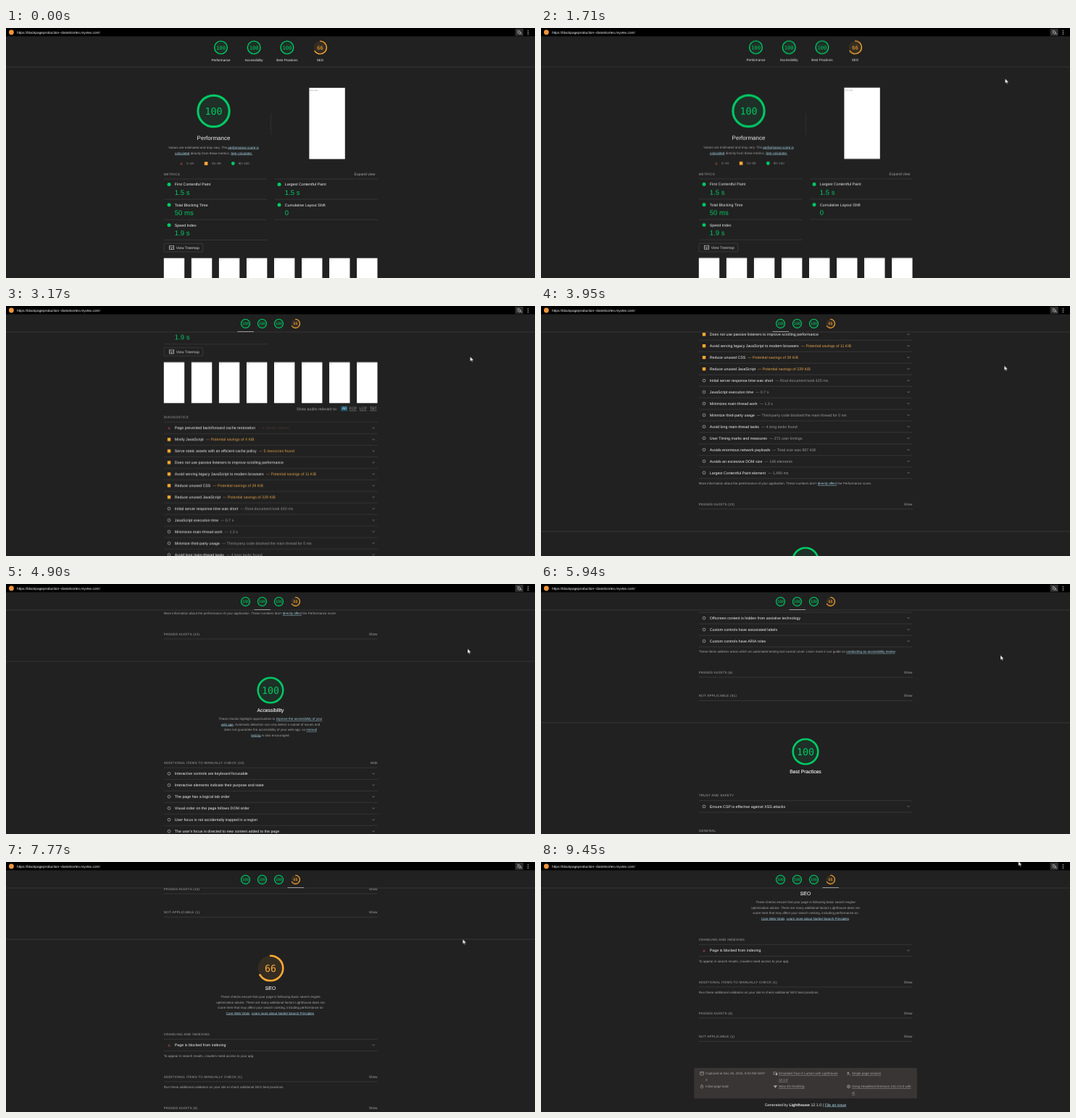
An HTML page for the animation above (9570 ms loop, 730 px wide and 346 px high).

```html
<!DOCTYPE html>
<html lang="en">
<head>
<meta charset="utf-8">
<title>Lighthouse report</title>
<style>
html, body { margin: 0; width: 100%; height: 100%; overflow: hidden; background: #212121; }
svg { display: block; width: 730px; height: 346px; }
text { font-family: "Liberation Sans", Arial, sans-serif; text-rendering: geometricPrecision; white-space: pre; }
.mono { font-family: "DejaVu Sans Mono", monospace; }
.caps { letter-spacing: .24px; }
.link { fill: #a8d4e6; text-decoration: underline; }
.under { text-decoration: underline; }
.rule { stroke: #464646; stroke-width: .6; }
#page { animation: scroll 9570ms linear infinite; }
#sticky { animation: reveal 9570ms step-end infinite; }
#mark { animation: mark 9570ms step-end infinite; }
#pointer { animation: move 9570ms linear infinite, appear 9570ms step-end infinite; }
@keyframes scroll {
  0%, 17.868% { transform: translateY(0); }
  19.331%, 22.466% { transform: translateY(-38px); }
  24.138%, 25.705% { transform: translateY(-76px); }
  26.541% { transform: translateY(-97px); }
  41.275%, 42.633% { transform: translateY(-418px); }
  43.156%, 45.037% { transform: translateY(-437px); }
  62.069%, 63.218% { transform: translateY(-950px); }
  81.191%, 82.132% { transform: translateY(-1318px); }
  84.117%, 88.401% { transform: translateY(-1406px); }
  90.7%, 100% { transform: translateY(-1449px); }
}
@keyframes reveal { 0% { opacity: 0; } 22.686%, 100% { opacity: 1; } }
@keyframes mark {
  0% { transform: translateX(0); }
  49.02% { transform: translateX(23px); }
  64.15% { transform: translateX(46px); }
  77.97%, 100% { transform: translateX(69px); }
}
@keyframes move {
  0%, 36.364% { transform: translate(640.5px, 70px); }
  41.275%, 42.633% { transform: translate(639.3px, 82.5px); }
  62.069%, 63.218% { transform: translate(634px, 98.5px); }
  81.191%, 95.611% { transform: translate(630.3px, 106.8px); }
  98.746%, 100% { transform: translate(658.8px, -1.2px); }
}
@keyframes appear { 0% { opacity: 0; } 17.868%, 100% { opacity: 1; } }
</style>
</head>
<body>
<svg viewBox="0 0 730 346">
  <g id="page"></g>
  <g id="sticky"></g>
  <g id="topbar"></g>
  <g id="pointer"><path d="M0 0V6.6L1.6 5.2L2.7 7.5L3.7 7L2.7 4.9H4.7Z" fill="#fff" stroke="#111" stroke-width=".4"/></g>
</svg>
<script>
const GREEN = '#00c964', ORANGE = '#fa3', RED = '#7a3c38', WHITE = '#f2f2f2', GREY = '#a6a6a6';
const LEFT = 217.8, RIGHT = 512.5, MID = 365, PITCH = 15.96;

// y is the vertical centre of the line
const text = (x, y, s, size = 5.3, fill = WHITE, attr = '') =>
  `<text x="${x}" y="${y + size * .35}" font-size="${size}" fill="${fill}" ${attr}>${s}</text>`;
const centre = (x, y, s, size, fill, attr = '') => text(x, y, s, size, fill, 'text-anchor="middle" ' + attr);
const right = (x, y, s, size, fill) => text(x, y, s, size, fill, 'text-anchor="end"');
const rect = (x, y, w, h, fill, attr = '') =>
  `<rect x="${x}" y="${y}" width="${w}" height="${h}" fill="${fill}" ${attr}/>`;
const dot = (x, y, r, fill, attr = '') => `<circle cx="${x}" cy="${y}" r="${r}" fill="${fill}" ${attr}/>`;
const rule = (y, x1 = LEFT, x2 = RIGHT) => `<line class="rule" x1="${x1}" x2="${x2}" y1="${y}" y2="${y}"/>`;
const line = (d, colour = GREY, w = .6) => `<path d="${d}" fill="none" stroke="${colour}" stroke-width="${w}"/>`;
const link = s => `<tspan class="link">${s}</tspan>`;
const triangle = (x, y) => `<path d="M${x} ${y - 1.9}l2 3.7h-4z" fill="${RED}"/>`;

function gauge(x, y, r, w, score, size) {
  const c = score < 90 ? ORANGE : GREEN, mid = r - w / 2;
  return dot(x, y, mid, c, 'fill-opacity=".09"') +
    dot(x, y, mid, 'none', `stroke="${c}" stroke-width="${w}" stroke-linecap="round" pathLength="100"
      stroke-dasharray="${score} 100" transform="rotate(-90 ${x} ${y})"`) +
    centre(x, y, score, size, c, 'class="mono"');
}

const markers = {
  fail: y => triangle(225, y),
  warn: y => rect(222.8, y - 2.2, 4.4, 4.4, ORANGE),
  info: y => dot(225, y, 1.9, 'none', 'stroke="#bdbdbd" stroke-width=".7"')
};

function audit(y, kind, title, detail) {
  const colour = { fail: '#4a3a39', warn: '#e3a24a', info: '#999' }[kind];
  const extra = detail ? `<tspan fill="${colour}">  — ${detail}</tspan>` : '';
  return markers[kind](y) + text(232.8, y, title + extra) +
    line(`M505.5 ${y - .8}l1.6 1.6l1.6 -1.6`) + rule(y + 8);
}
const audits = (y, list) => list.map((a, i) => audit(y + i * PITCH, ...a)).join('');
const heading = (y, s) => text(LEFT, y, s, 4.56, GREY, 'class="caps"');
const group = (y, s, list) => heading(y, s) + rule(y + 7.3) + audits(y + 15.4, list);
const clump = (y, s, label = 'Show') => heading(y, s) + right(RIGHT, y, label, 4.7, GREY) + rule(y + 7);
const note = (y, s) => text(LEFT, y, s, 4.5, GREY);

function category(y, title, score, lines = []) {
  return rule(y, 0, 730) + gauge(MID, y + 40, 18.6, 2.6, score, 13.3) +
    centre(MID, y + 68, title, 6.8, WHITE, 'stroke="#f2f2f2" stroke-width=".12"') +
    lines.map((s, i) => centre(MID, y + 79.5 + i * 7.5, s, 4.5, GREY)).join('');
}

function metric(x, y, title, value) {
  return dot(x, y, 2.5, GREEN) + text(x + 7.8, y, title) +
    text(x + 7.8, y + 11, value, 9.5, GREEN);
}

const names = ['Performance', 'Accessibility', 'Best Practices', 'SEO'], scores = [100, 100, 100, 66];

function summary() {
  return names.map((n, i) => gauge(296.5 + i * 45.7, 27, 9.6, 1.4, scores[i], 7.2) +
    centre(296.5 + i * 45.7, 44, n, 4.56, WHITE)).join('') + rule(54, 0, 730);
}

function performance_() {
  let s = gauge(286.5, 115, 23.2, 3.1, 100, 13.4) + centre(286.5, 152.2, 'Performance', 8, WHITE) +
    centre(286.5, 165, 'Values are estimated and may vary. The ' + link('performance score is'), 4.56, GREY) +
    centre(286.5, 173, link('calculated') + ' directly from these metrics. ' + link('See calculator.'), 4.56, GREY) +
    triangle(242, 187.5) + text(249, 187.5, '0–49', 4.5, '#8c8c8c') +
    rect(273.8, 185.2, 4.6, 4.6, ORANGE) + text(284, 187.5, '50–89', 4.5, '#8c8c8c') +
    dot(313.3, 187.5, 2.4, GREEN) + text(320.8, 187.5, '90–100', 4.5, '#8c8c8c') +
    line('M365.5 118V148', '#3a3a3a') +
    rect(418.4, 82.8, 49.4, 98.6, '#fff') + text(419.3, 86.4, 'Black page', 2.2, '#777');
  s += heading(202, 'METRICS') + right(509.5, 202, 'Expand view', 5.1, GREY);
  for (let i = 0; i < 4; i++) {
    const y = 209 + i * 28.1;
    s += rule(y, LEFT, 360) + (i < 3 ? rule(y, 371, RIGHT) : '');
  }
  s += metric(225, 216.6, 'First Contentful Paint', '1.5 s') + metric(377, 216.6, 'Largest Contentful Paint', '1.5 s') +
    metric(225, 244.7, 'Total Blocking Time', '50 ms') + metric(377, 244.7, 'Cumulative Layout Shift', '0') +
    metric(225, 272.8, 'Speed Index', '1.9 s');
  s += rect(218, 298.2, 53.6, 11.6, 'none', 'stroke="#4c4c4c" stroke-width=".6" rx="1"') +
    rect(225.3, 301.6, 6.4, 4.8, 'none', 'stroke="#ccc" stroke-width=".7"') +
    line('M225.3 304H231.7M228.5 304V306.4', '#ccc') + text(234.8, 304, 'View Treemap', 5, '#d8d8d8');
  for (let i = 0; i < 8; i++) s += rect(217.8 + i * 38.05, 318.5, 28.4, 56.5, '#fff') +
    (i > 1 ? text(218.6 + i * 38.05, 320.6, 'Black', 1.5, '#999') : '');
  s += text(401, 382.7, 'Show audits relevant to:', 5.25, GREY) +
    rect(462, 379.2, 9.4, 6.8, '#1d5672', 'rx="1"') + centre(466.7, 382.7, 'All', 5.1, WHITE);
  ['FCP', 'LCP', 'TBT'].forEach((n, i) => s += text(473.8 + i * 14.1, 382.7, n, 5.1, GREY, 'class="under"'));
  return s + group(394, 'DIAGNOSTICS', [
    ['fail', 'Page prevented back/forward cache restoration', '1 failure reason'],
    ['warn', 'Minify JavaScript', 'Potential savings of 4 KiB'],
    ['warn', 'Serve static assets with an efficient cache policy', '5 resources found'],
    ['warn', 'Does not use passive listeners to improve scrolling performance'],
    ['warn', 'Avoid serving legacy JavaScript to modern browsers', 'Potential savings of 11 KiB'],
    ['warn', 'Reduce unused CSS', 'Potential savings of 29 KiB'],
    ['warn', 'Reduce unused JavaScript', 'Potential savings of 229 KiB'],
    ['info', 'Initial server response time was short', 'Root document took 420 ms'],
    ['info', 'JavaScript execution time', '0.7 s'],
    ['info', 'Minimizes main-thread work', '1.3 s'],
    ['info', 'Minimize third-party usage', 'Third-party code blocked the main thread for 0 ms'],
    ['info', 'Avoid long main-thread tasks', '4 long tasks found'],
    ['info', 'User Timing marks and measures', '271 user timings'],
    ['info', 'Avoids enormous network payloads', 'Total size was 697 KiB'],
    ['info', 'Avoids an excessive DOM size', '148 elements'],
    ['info', 'Largest Contentful Paint element', '1,490 ms']
  ]) + note(663.5, `More information about the performance of your application. These numbers don't ${link('directly affect')} the Performance score.`) +
    clump(692, 'PASSED AUDITS (22)');
}

function accessibility() {
  return category(730, 'Accessibility', 100, [
    'These checks highlight opportunities to ' + link('improve the accessibility of your'),
    link('web app') + '. Automatic detection can only detect a subset of issues and',
    'does not guarantee the accessibility of your web app, so ' + link('manual'),
    link('testing') + ' is also encouraged.'
  ]) + right(RIGHT, 870, 'Hide', 4.7, GREY) + group(870, 'ADDITIONAL ITEMS TO MANUALLY CHECK (10)', [
    'Interactive controls are keyboard focusable',
    'Interactive elements indicate their purpose and state',
    'The page has a logical tab order',
    'Visual order on the page follows DOM order',
    'User focus is not accidentally trapped in a region',
    "The user's focus is directed to new content added to the page",
    'HTML5 landmark elements are used to improve navigation',
    'Offscreen content is hidden from assistive technology',
    'Custom controls have associated labels',
    'Custom controls have ARIA roles'
  ].map(n => ['info', n])) +
    note(1043.3, `These items address areas which an automated testing tool cannot cover. Learn more in our guide on ${link('conducting an accessibility review')}.`) +
    clump(1072, 'PASSED AUDITS (6)') + clump(1104.5, 'NOT APPLICABLE (51)');
}

function practices() {
  return category(1142, 'Best Practices', 100) +
    group(1242.5, 'TRUST AND SAFETY', [['info', 'Ensure CSP is effective against XSS attacks']]) +
    group(1291, 'GENERAL', [
      ['info', 'Detected JavaScript libraries'],
      ['info', 'Missing source maps for large first-party JavaScript']
    ]) + clump(1355, 'PASSED AUDITS (15)') + clump(1387.3, 'NOT APPLICABLE (1)');
}

function seo() {
  return category(1425, 'SEO', 66, [
    'These checks ensure that your page is following basic search engine',
    'optimization advice. There are many additional factors Lighthouse does not',
    'score here that may affect your search ranking, including performance on',
    link('Core Web Vitals') + '. ' + link('Learn more about Norbel Search Principles') + '.'
  ]) + group(1556, 'CRAWLING AND INDEXING', [['fail', 'Page is blocked from indexing']]) +
    note(1586, 'To appear in search results, crawlers need access to your app.') +
    clump(1615, 'ADDITIONAL ITEMS TO MANUALLY CHECK (1)') +
    note(1629.3, 'Run these additional validators on your site to check additional SEO best practices.') +
    clump(1658, 'PASSED AUDITS (6)') + clump(1690.3, 'NOT APPLICABLE (1)');
}

function footer() {
  const item = (x, y, s, cls = '') => text(x, y, s, 4.5, '#a9a3a3', `class="${cls}"`);
  const y1 = 1741.7, y2 = 1759.8, wrap = 9;
  return rect(211.3, 1734, 307.6, 42.3, '#393535', 'rx="1"') +
    rect(219.8, y1 - 2, 4.4, 4.2, 'none', 'stroke="#a9a3a3" stroke-width=".6"') + line(`M219.8 ${y1 - .7}h4.4`) +
    item(227, y1, 'Captured at Dec 26, 2024, 8:03 AM GMT-') + item(227, y1 + wrap, '3') +
    dot(222, y2 + .3, 1.9, 'none', 'stroke="#a9a3a3" stroke-width=".6"') + line(`M222 ${y2 - 1}v1.4M221.2 ${y2 - 2.4}h1.6`) +
    item(227, y2, 'Initial page load') +
    rect(321, y1 - 1.8, 4, 3, 'none', 'stroke="#a9a3a3" stroke-width=".6"') + rect(324, y1 - .6, 2.2, 3, '#a9a3a3') +
    item(328, y1, 'Emulated Tavo K Lumen with Lighthouse', 'under') + item(328, y1 + wrap, '12.1.0', 'under') +
    `<path d="M320.8 ${y2 - 1.6}h5.2l-2.6 3.8z" fill="#a9a3a3"/>` + item(328, y2, 'Slow 4G throttling', 'under') +
    dot(423.8, y1 - 1, 1.1, '#a9a3a3') + line(`M422.2 ${y1 + 2}q1.6 -2.4 3.2 -.4l1.4 .6`, '#a9a3a3', .8) +
    item(429, y1, 'Single page session', 'under') +
    dot(424.5, y2, 2, 'none', 'stroke="#a9a3a3" stroke-width=".8"') + dot(424.5, y2, .8, '#a9a3a3') +
    item(429, y2, 'Using HeadlessChromium 131.0.0.0 with', 'under') + item(429, y2 + wrap, 'cli', 'under') +
    centre(MID, 1784.7, `Generated by <tspan font-weight="700">Lighthouse</tspan> 12.1.0 | ${link('File an issue')}`, 5.3, WHITE);
}

function sticky() {
  return rect(0, 11, 730, 25, '#212121') + rule(36, 0, 730) +
    scores.map((n, i) => gauge(330.5 + i * 23, 24.3, 6.6, 1.1, n, 5)).join('') +
    `<g id="mark">${rect(319.5, 35, 22.5, .9, '#a8a8a8')}</g>`;
}

function topbar() {
  return rect(0, 0, 730, 11.4, '#000') + dot(7.4, 6, 3.4, '#f0953a') +
    text(15, 5.9, 'https://blackpageproduction--danielcortes.myvtex.com/', 4.75, WHITE) +
    rect(702.6, .8, 11.2, 10, '#2e2e2e') +
    line('M705 4h4.4M707.2 3v1M708.6 4q-.8 2.4 -3.4 3.8M705.8 5.2q.8 1.6 2.4 2.4M708.2 9.2l1.7 -4.2l1.7 4.2M708.8 7.9h2.2', '#c4c4c4', .6) +
    [3.6, 6, 8.4].map(y => dot(720.4, y, .7, '#d0d0d0')).join('');
}

const put = (id, markup) => document.getElementById(id).innerHTML = markup;
put('page', summary() + performance_() + accessibility() + practices() + seo() + footer());
put('sticky', sticky());
put('topbar', topbar());
</script>
</body>
</html>
```
